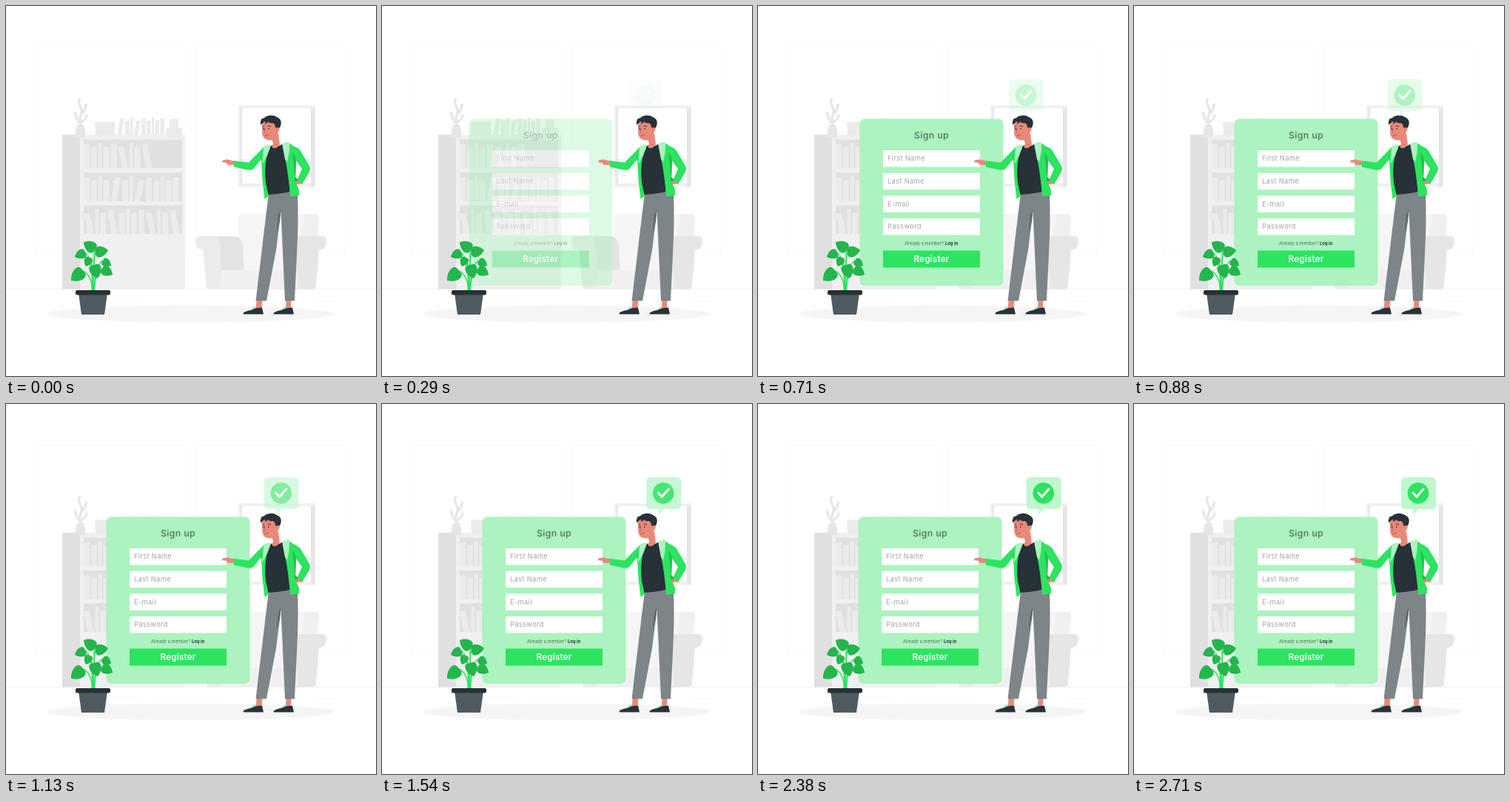
An HTML page for the animation above (2.75 s loop, 500 by 500 pixels).

```html
<!DOCTYPE html>
<html lang="en">
<head>
<meta charset="utf-8">
<title>Sign up</title>
<style>
html, body { margin: 0; width: 100%; height: 100%; overflow: hidden; background: #fff; }
svg { display: block; width: 500px; height: 500px; }
text { font-family: Inter, "Open Sans", sans-serif; }
.label { font-size: 9.4px; fill: #a6a6a6; letter-spacing: .3px; }
.skin { fill: #e8897a; }
.dark { fill: #263238; }
.green { fill: #2de360; }
.shade { fill: #22bd4d; }
.pale { fill: #abf3bf; }
.line { fill: none; stroke-linecap: round; stroke-linejoin: round; }
</style>
</head>
<body>
<svg viewBox="0 0 500 500">
  <!-- room -->
  <g fill="none" stroke="#fafafa">
    <rect x="39.5" y="55.5" width="203" height="282"/>
    <rect x="255.5" y="55.5" width="203" height="282"/>
    <path d="M416 398.5h32M120 395.5h62"/>
    <path d="M0 382.5H500" stroke="#f0f0f0"/>
  </g>
  <ellipse cx="249.5" cy="416" rx="193.5" ry="11.3" fill="#f5f5f5"/>

  <!-- bookcase -->
  <path d="M76 174h25v208.500h-25z" fill="#e0e0e0"/>
  <path d="M100 174h142v208.500h-142z" fill="#f0f0f0"/>
  <path d="M105 180.500h133v38.500h-133zM105 225h133v39h-133zM105 269.500h133v38.500h-133z" fill="#e0e0e0"/>
  <g id="books" fill="#ebebeb"></g>
  <path d="M120.500 156.500h26.500v18h-26.500zM221 152.500h11.500v12h5.500v13.500h-22v-13.500h5z" fill="#ebebeb"/>
  <path d="M96 160.500h9q3 10 2 16.500h-13q-1-6 2-16.500z" fill="#e6e6e6"/>
  <path class="line" stroke="#e6e6e6" stroke-width="3.200" d="M101 161Q99 154 101 147Q104 141 100 135Q97 130 99.500 126M100 158Q94 152 93.500 144M102 157Q109 152 109 148M102 146Q107 141 108.500 133"/>

  <!-- window -->
  <path d="M314 134.500h104v110h-104z" fill="#f0f0f0"/>
  <path d="M412 138h5.500v106h-5.500z" fill="#e6e6e6"/>
  <path d="M317 138h2v102h-2z" fill="#e6e6e6"/>
  <path d="M319 138h93v101.500h-93z" fill="#fff"/>
  <path d="M319 207h93v4h-93z" fill="#f1f1f1"/>

  <!-- armchair -->
  <path d="M319 281h99q6 0 5 6l-7 76h-104l2-76q0-6 5-6z" fill="#f5f5f5"/>
  <path d="M402 281h16q6 0 5 6l-3 28h-20z" fill="#f0f0f0"/>
  <path d="M388 311h39q7 0 6 8q-1 10-10 11l-4 47q0 5.500-6 5.500h-30z" fill="#e6e6e6"/>
  <path d="M270 320h52v37h72v25.500h-118q-5 0-5.500-5z" fill="#f0f0f0"/>
  <path d="M270 311h38q9 0 11 11l3 35h-40z" fill="#e3e3e3"/>
  <path d="M262 311h19q7 2 8 12l2 34l-2 25.500h-13q-5 0-5.500-5l-4-47.500q-9 0-10.500-11q-1-8 6-8z" fill="#ebebeb"/>

  <!-- sign-up form -->
  <g id="form" opacity="0">
    <rect class="pale" x="135.500" y="152.500" width="194" height="225.500" rx="7"/>
    <text x="232.500" y="178.500" text-anchor="middle" font-size="12.300" font-weight="500" letter-spacing=".4" fill="#53705d">Sign up</text>
    <g id="fields"></g>
    <text x="196" y="323" font-size="5.700" letter-spacing=".06" fill="#55685c">Already a member?</text>
    <text x="251" y="323" font-size="5.700" font-weight="700" letter-spacing=".12" fill="#263238">Log in</text>
    <rect class="green" x="167" y="330.500" width="131" height="23"/>
    <text x="232.500" y="345.500" text-anchor="middle" font-size="11.800" font-weight="600" letter-spacing=".1" fill="#fff">Register</text>
  </g>

  <!-- plant -->
  <g id="stems" class="line" stroke="#2de360" stroke-width="1.400"></g>
  <g id="leaves" fill="#24b64d"></g>
  <path d="M98 388h39l-4 29h-31z" fill="#505b61"/>
  <rect class="dark" x="94" y="384" width="47" height="6.500" rx="2"/>

  <!-- legs -->
  <path class="skin" d="M339 396h7.500l-1 13h-8zM378.500 396h7l-.5 13h-7z"/>
  <g class="dark">
    <path d="M320.500 415Q323 412.500 331 411L337 408.500L346 407.500L348 416.500H321z"/>
    <path d="M361.500 415Q364 412.500 372 411L378 408.500L387 407.500L389 416.500H362z"/>
  </g>
  <path class="line" stroke="#8deda8" stroke-width="1.800" d="M333 409l4-2M374 409l4-2"/>
  <path d="M355 253L394 251Q395.500 290 393 335L390 398.500H377L371.500 277L365 330L352 398.500H337.500L347 319Q351 285 355 253z" fill="#7d8588"/>
  <path d="M371.500 275Q366 283 366.500 306L370 290z" fill="#5f686c"/>

  <!-- torso -->
  <path class="dark" d="M357 188Q365 193 374 186L381 207L386 251Q369 254 354 255Q346 232 348 204z"/>
  <path class="green" d="M307 209L328 211.500Q337 202 345 194Q351 187 358 189L352 205Q349 220 351 239L355 257L349.500 261Q345.500 234 345 207L334 220.500Q331 222.500 326 221.500L308 217.500z"/>
  <path class="shade" d="M345 212Q346 204 344 199Q346 222 347 236z"/>
  <path class="green" d="M374 186Q382 183 388 189Q397 192 400 199L410.500 217Q412 221 409 226L400 241L392 238L400 220L392 209L391 236L396 249L396 256L384 257.500Q382 229 377 205z"/>
  <path class="shade" d="M392 209Q390 200 387 198Q390 217 390 238L395 239L394 234L391 231z"/>
  <path class="pale" d="M348 190Q353 187 358 188L352 204L346 214Q348 201 348 190zM373 186L382 183Q385 189 380 211L377 207z"/>
  <path class="skin" d="M308 209.500L299 207.300L293 208.500Q291 210 293 211.200L298 212L299 214.500L307 215zM390 237.500L397 236.500L399 239Q395 242 391 240.500z"/>

  <!-- head -->
  <path class="skin" d="M359 178L368 172L370 187Q367 193 361 192Q358 190 361 186z"/>
  <path class="skin" d="M346 158Q348 153 357 153L369 158L368 169Q367 176 362 180Q357 183 351 180Q346 178 346 169z"/>
  <path class="dark" d="M345 161Q342 157 346 152Q349 152 351 149.500Q359 146 366 150Q373 153 371.500 160Q371 165 367 166L364 164Q364 159 360 158Q356 159 354 156Q353 159 350 159L351 156Q346 157 345 161z"/>
  <circle class="skin" cx="367" cy="167" r="2.700"/>
  <g class="dark"><circle cx="348.500" cy="166" r=".9"/><circle cx="355" cy="165.800" r=".9"/></g>
  <g class="line" stroke="#263238" stroke-width=".8">
    <path d="M346.500 163l2.500-.5M354 162.300q2-1 4 .5"/>
    <path d="M350.500 166l-1.800 5l2 .4" stroke="#b95e55"/>
    <path d="M350 175.500q3 .5 5.500-2" stroke="#a9433c"/>
  </g>

  <!-- confirmation bubble -->
  <g id="bubble" opacity="0">
    <path fill="#c0f7cf" d="M367 99h35q6 0 6 6v31q0 6-6 6h-17.500l-8 8l1.500-8h-11q-6 0-6-6v-31q0-6 6-6z"/>
    <circle class="green" cx="384" cy="120.500" r="14.300"/>
    <path class="line" stroke="#fff" stroke-width="3" d="M377 120l5 5.500l9-10.500"/>
  </g>
</svg>
<script>
const byId = id => document.getElementById(id);
const append = (id, markup) => byId(id).insertAdjacentHTML('beforeend', markup);

// Every fourth book is thin and tallest; the others alternate between two heights.
function addBooks({ x = 105, base, count, leaning, side, phase = 0, scale = 1 }) {
  let d = '';
  for (let i = 0; i < count; i++) {
    const kind = (i + phase) % 4;
    const width = (kind === 2 ? 4.5 : 8) * scale;
    const height = (kind === 2 ? 34 : kind === 0 ? 32.5 : 28.5) * scale;
    const lean = leaning.includes(i) ? 5.5 * scale : 0;
    const foot = side < 0 ? x + lean : x;
    d += `M${foot} ${base}h${width}l${side * lean} ${-height}h${-width}z`;
    x += width + lean + 2 * scale;
  }
  append('books', `<path d="${d}"/>`);
}
addBooks({ base: 219, count: 9, leaning: [5, 8], side: -1 });
addBooks({ base: 264, count: 13, leaning: [4, 7], side: 1 });
addBooks({ base: 308, count: 12, leaning: [0, 3, 8, 11], side: -1, phase: 1 });
addBooks({ x: 150.5, base: 174.5, count: 9, leaning: [0, 3], side: 1, scale: .69 });

// A leaf spans from its base to its tip; a bent stem ties the base to the pot.
function addLeaf(x, y, tipX, tipY) {
  const length = Math.hypot(tipX - x, tipY - y);
  const angle = Math.atan2(tipY - y, tipX - x) * 180 / Math.PI;
  const root = 118 + (x - 118) * .12;
  append('stems', `<path d="M${root} 385Q${root} ${y + 6} ${x} ${y}"/>`);
  append('leaves', `<path d="M0 0C-.15-.6 .6-.55 1 0C.6 .55-.15 .6 0 0z"
    transform="translate(${x} ${y}) rotate(${angle}) scale(${length})"/>`);
}
addLeaf(120, 329, 105, 319);
addLeaf(121, 333, 138, 330);
addLeaf(107, 333, 93, 339);
addLeaf(113, 340, 108, 352);
addLeaf(131, 344, 142, 351);
addLeaf(104, 358, 88, 371);
addLeaf(119, 350, 124, 368);
addLeaf(130, 355, 144, 363);

['First Name', 'Last Name', 'E-mail', 'Password'].forEach((label, i) => {
  const y = 195 + i * 30.65;
  append('fields', `<rect x="167" y="${y}" width="131" height="22.5" fill="#fff"/>
    <text class="label" x="173" y="${y + 14.2}">${label}</text>`);
});

const LOOP = 2750, STEPS = 66, STEP = LOOP / STEPS;

const bezier = (a, b, s) => 3 * a * s * (1 - s) ** 2 + 3 * b * s * s * (1 - s) + s ** 3;

// cubic-bezier(.36, -.01, .5, 1.38): eases in and overshoots slightly
function ease(x) {
  if (x <= 0 || x >= 1) return x <= 0 ? 0 : 1;
  let low = 0, high = 1;
  for (let i = 0; i < 24; i++) {
    const mid = (low + high) / 2;
    if (bezier(.36, .5, mid) < x) low = mid; else high = mid;
  }
  return bezier(-.01, 1.38, low);
}

function slideIn(element, progress) {
  const p = ease(progress);
  element.setAttribute('transform', `translate(${30 * (p - 1)} 0)`);
  element.setAttribute('opacity', Math.min(1, Math.max(0, p)));
}

const form = byId('form'), bubble = byId('bubble');
const start = performance.now();

function draw(now) {
  const time = Math.max(0, now - start) % LOOP;
  const step = Math.min(STEPS - 1, Math.floor((time + 5) / STEP));
  slideIn(form, step / 21);
  slideIn(bubble, (step + 1) / STEPS);
  requestAnimationFrame(draw);
}
draw(start);
</script>
</body>
</html>
```
